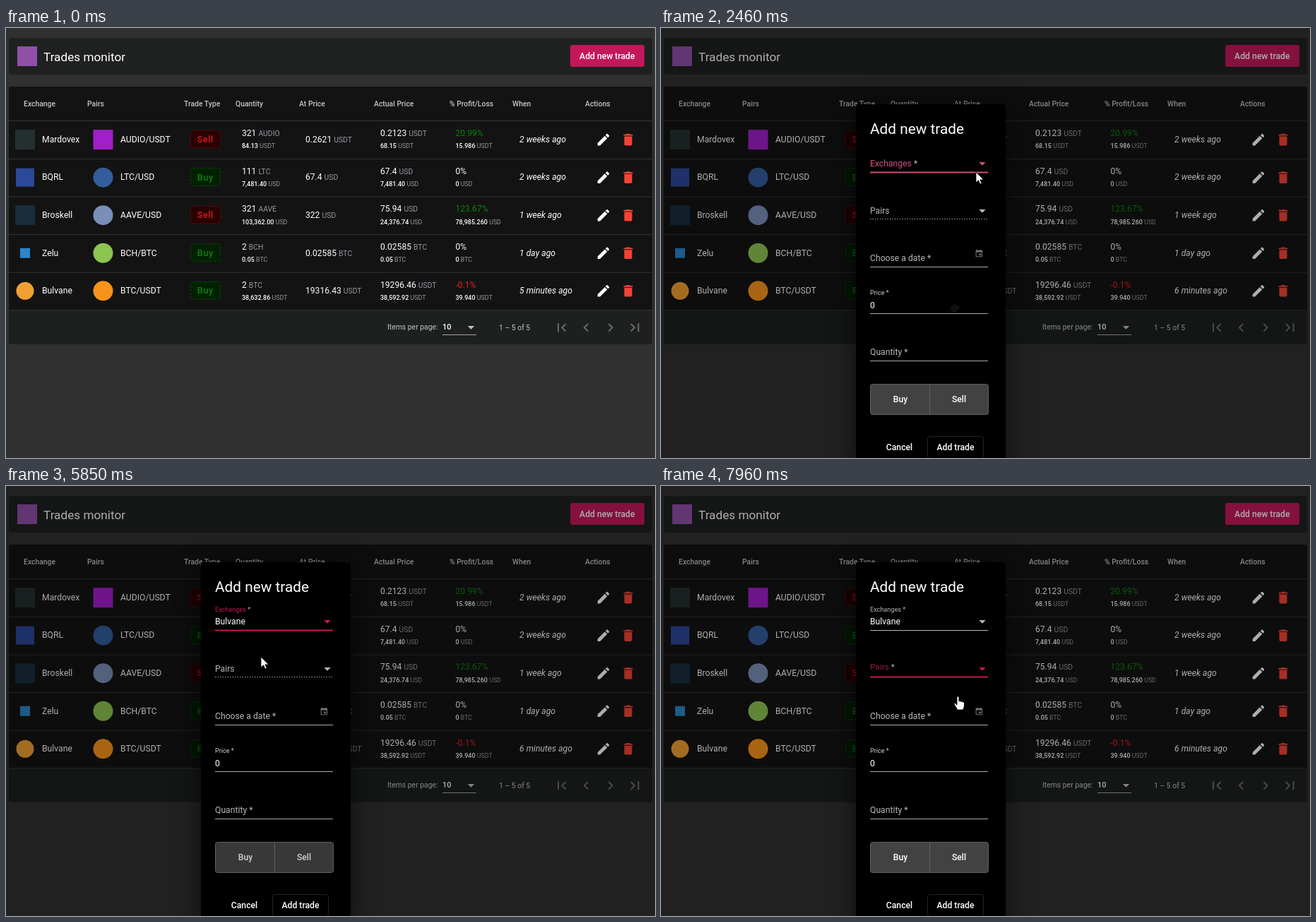
These frames come from a looping animation (919x609 px, 8000 ms). An HTML page:

```html
<!DOCTYPE html>
<html lang="en">
<head>
<meta charset="utf-8">
<title>Trades monitor</title>
<style>
html, body { margin: 0; width: 100%; height: 100%; overflow: hidden; background: #303030; }
svg { display: block; width: 919px; height: 609px; }
text { font-family: Roboto, "Open Sans", sans-serif; white-space: pre; }
.shadow { filter: drop-shadow(0 7px 18px rgba(0,0,0,.6)); }
</style>
</head>
<body>
<svg viewBox="0 0 919 609">
  <defs><clipPath id="panelClip"><rect id="panelBox" x="283" y="174" width="193.5" height="222" rx="3"/></clipPath></defs>
  <g id="page"></g>
  <g id="live"></g>
  <g id="pointer"></g>
</svg>
<script>
const LOOP = 8000, PINK = '#c2185b', SOFT = '#b8b8b8';
const el = id => document.getElementById(id);
const ramp = (t, a, b) => Math.min(1, Math.max(0, (t - a) / (b - a)));
const mix = (a, b, k) => a + (b - a) * k;
const smooth = k => k * k * (3 - 2 * k);
const easeOut = k => 1 - (1 - k) ** 3;

// y is the middle of the capital letters
const text = (x, y, s, { size = 12.2, fill = '#fff', w = 400, a = 'start', more = '' } = {}) =>
  `<text x="${x}" y="${y + size * .355}" font-size="${size}" fill="${fill}" font-weight="${w}" text-anchor="${a}" ${more}>${s}</text>`;
const rect = (x, y, w, h, fill, more = '') =>
  `<rect x="${x}" y="${y}" width="${w}" height="${h}" fill="${fill}" ${more}/>`;
const line = (x1, x2, y, color, w = 1, more = '') =>
  `<path d="M${x1} ${y}H${x2}" stroke="${color}" stroke-width="${w}" ${more}/>`;
const icon = (x, y, d, fill, k = .92) =>
  `<path transform="translate(${x} ${y}) scale(${k}) translate(-12 -12)" d="${d}" fill="${fill}"/>`;
const arrow = (x, y, fill) => `<path d="M${x - 4.7} ${y - 2}h9.4l-4.7 4.7z" fill="${fill}"/>`;
const badge = (x, y, [shape, color, size]) => shape === 'o'
  ? `<circle cx="${x}" cy="${y}" r="${size / 2}" fill="${color}"/>`
  : rect(x - size / 2, y - size / 2, size, size, color);

const marks = {
  Mardovex: ['s', '#24302f', 28], BQRL: ['s', '#2c4899', 26], Broskell: ['s', '#172d3e', 28],
  Zelu: ['s', '#2b86c8', 14], Bulvane: ['o', '#f0a030', 25], Bostwyn: ['o', '#0f82dd', 28],
  Drovik: ['o', '#5741d9', 28], Brambelicott: ['s', '#1f1f1f', 22], OrbVEL: ['s', '#2b9cd6', 24],
  AUDIO: ['s', '#a01fc8', 28], LTC: ['o', '#345d9d', 28], AAVE: ['o', '#7a8fb8', 28],
  BCH: ['o', '#8dc351', 28], BTC: ['o', '#f7931a', 28]
};

const icons = {
  edit: 'M3 17.25V21h3.75L17.81 9.94l-3.75-3.75L3 17.25zM20.71 7.04c.39-.39.39-1.02 0-1.41l-2.34-2.34c-.39-.39-1.02-.39-1.41 0l-1.83 1.83 3.75 3.75 1.83-1.83z',
  bin: 'M6 19c0 1.1.9 2 2 2h8c1.1 0 2-.9 2-2V7H6v12zM19 4h-3.5l-1-1h-5l-1 1H5v2h14V4z',
  date: 'M17 12h-5v5h5v-5zM16 1v2H8V1H6v2H5c-1.1 0-1.99.9-1.99 2L3 19c0 1.1.89 2 2 2h14c1.1 0 2-.9 2-2V5c0-1.1-.9-2-2-2h-1V1h-2zm3 18H5V8h14v11z',
  first: 'M18.41 16.59L13.82 12l4.59-4.59L17 6l-6 6 6 6zM6 6h2v12H6z',
  prev: 'M15.41 7.41L14 6l-6 6 6 6 1.41-1.41L10.83 12z',
  next: 'M10 6L8.59 7.41 13.17 12l-4.58 4.59L10 18l6-6z',
  last: 'M5.59 7.41L10.18 12l-4.59 4.59L7 18l6-6-6-6zM16 6h2v12h-2z'
};

const heads = { Exchange: 25, Pairs: 115, 'Trade Type': 252, Quantity: 325, 'At Price': 415,
  'Actual Price': 521, '% Profit/Loss': 628, When: 717, Actions: 820 };

// exchange, coin, currency, side, amount, total, price, actual, actual total, profit, gain, when
const trades = [
  ['Mardovex', 'AUDIO', 'USDT', 'Sell', '321', '84.13', '0.2621', '0.2123', '68.15', '20.99%', '15.986', '2 weeks ago'],
  ['BQRL', 'LTC', 'USD', 'Buy', '111', '7,481.40', '67.4', '67.4', '7,481.40', '0%', '0', '2 weeks ago'],
  ['Broskell', 'AAVE', 'USD', 'Sell', '321', '103,362.00', '322', '75.94', '24,376.74', '123.67%', '78,985.260', '1 week ago'],
  ['Zelu', 'BCH', 'BTC', 'Buy', '2', '0.05', '0.02585', '0.02585', '0.05', '0%', '0', '1 day ago'],
  ['Bulvane', 'BTC', 'USDT', 'Buy', '2', '38,632.86', '19316.43', '19296.46', '38,592.92', '-0.1%', '39.940', '5 minutes ago']
];

const unit = (s, size) => ` <tspan font-size="${size}" font-weight="400" fill="#949aa3">${s}</tspan>`;
const big = (x, y, n, u) => text(x, y, n + unit(u, 10.4), { size: 12.1 });
const small = (x, y, n, u) => text(x, y, n + unit(u, 8.8), { size: 9, w: 500 });

function tradeRow([name, coin, cur, side, amount, total, price, actual, actualTotal, profit, gain, when], i) {
  const y = 157.6 + i * 53.55, up = y - 8.5, down = y + 9.7;
  const [fill, edge, ink] = side === 'Sell' ? ['#2b0000', '#6a0c0c', '#d81c1c'] : ['#002100', '#0c4d0c', '#128012'];
  const tone = profit === '0%' ? '#fff' : profit[0] === '-' ? '#f01c1c' : '#0c800c';
  return line(4, 915, y + 27.9, '#343434') +
    badge(27, y + .5, marks[name]) + text(51, y, name) +
    badge(137.5, y + .5, marks[coin]) + text(162, y, `${coin}/${cur}`) +
    rect(261.5, y - 12.3, 42, 24.5, fill, `rx="4" stroke="${edge}" stroke-dasharray="3 2"`) +
    text(282.3, y, side, { size: 12.6, fill: ink, w: 500, a: 'middle', more: 'letter-spacing=".6"' }) +
    big(334, up, amount, coin) + small(334, down, total, cur) +
    big(424, y, price, cur) +
    big(530, up, actual, cur) + small(530, down, actualTotal, cur) +
    text(636.5, up, profit, { size: 12.1, fill: tone }) + small(636.5, down, gain, cur) +
    text(727, y, when, { more: `font-style="italic"${i === 4 ? ' id="age"' : ''}` }) +
    icon(846, y + .5, icons.edit, '#fff') + icon(881, y + .5, icons.bin, '#f44336');
}

el('page').innerHTML =
  rect(4, 14, 911, 52, '#1f2120', 'rx="4"') +
  badge(30, 40, ['s', '#8f50a8', 28]) +
  text(53, 41, 'Trades monitor', { size: 17.2 }) +
  rect(799, 24, 105, 31, PINK, 'rx="3"') +
  rect(799, 24, 105, 31, '#fff', 'rx="3" id="ripple" opacity="0"') +
  text(851.3, 39.2, 'Add new trade', { w: 500, a: 'middle' }) +
  rect(4, 83, 911, 365, '#1e2020', 'rx="3"') + rect(4, 83, 911, 317, '#131313', 'rx="3"') +
  line(4, 915, 131.5, '#343434') +
  Object.entries(heads).map(([s, x]) => text(x, 107, s, { size: 10.4, fill: '#c4c4c4', w: 500 })).join('') +
  trades.map(tradeRow).join('') +
  text(540, 423.3, 'Items per page:', { size: 10.4, fill: '#c4c4c4' }) +
  text(618, 423.3, '10', { size: 11, w: 500 }) + line(618, 666, 434.5, '#a5a5a5') + arrow(658.5, 424, '#c4c4c4') +
  text(698, 424, '1 – 5 of 5', { size: 10.4, fill: '#c4c4c4' }) +
  ['first', 'prev', 'next', 'last'].map((k, i) => icon(787 + i * 34.5, 424.3, icons[k], '#6c6c6c', 1)).join('');

// Field label that floats up and shrinks as k goes to 1
const label = (y, s, star, color, k) => {
  const size = mix(12.2, 9.1, k);
  return text(296, mix(y, y - 17, k), s + (star ? `<tspan fill="${SOFT}"> *</tspan>` : ''), { size, fill: color });
};

function arc(from, to, color, width, r, opacity = 1) {
  const at = d => `${396 + r * Math.cos(d * Math.PI / 180)} ${379 + r * Math.sin(d * Math.PI / 180)}`;
  return `<path d="M${at(from)}A${r} ${r} 0 0 1 ${at(to)}" fill="none" stroke="${color}" stroke-width="${width}" opacity="${opacity}"/>`;
}

function spinner(t) {
  if (t < 5850) {
    const k = ramp(t, 1120, 2460), a = mix(2, 43, k), c = mix(42, 13, k);
    return arc(a - 12, a + 12, `rgb(${c},${c + 3 * k},${c})`, 9, 27);
  }
  const a = 8 + (t - 6270) * .24;
  return arc(a, a + 132, '#202423', 8, 28, ramp(t, 5850, 6000) * (1 - ramp(t, 6500, 6570)));
}

function dialog(t) {
  const open = easeOut(ramp(t, 1050, 1200)), scale = mix(.7, 1, open);
  const focused = t >= 2400 && t < 7890, chosen = t >= 5690;
  const exColor = focused ? (t < 2560 ? '#cf4f83' : PINK) : SOFT;
  const busy = t > 5790 && t < 6560, ready = t >= 6560, onPairs = t >= 7890;
  const pairColor = onPairs ? PINK : SOFT;
  const pairLine = onPairs ? line(296, 463, 270.5, PINK, 2)
    : line(296, 463, 270.5, '#aaa', 1, ready ? '' : 'stroke-dasharray="1.5 2"');
  const toggleInk = busy ? '#d0d0d0' : '#fff';
  const field = y => line(296, 463, y, '#aaa');
  return `<g opacity="${open}" transform="translate(382 362) scale(${scale}) translate(-382 -362)">` +
    rect(276, 108, 212, 522, '#000', 'rx="4" class="shadow"') +
    text(296, 142.3, 'Add new trade', { size: 20.8 }) +
    label(192, 'Exchanges', true, exColor, smooth(ramp(t, 2560, 2700))) +
    (chosen ? text(296, 192, 'Bulvane') : '') +
    arrow(455, 192, exColor) + line(296, 463, 204.5, exColor, focused ? 2 : 1) +
    label(258.5, 'Pairs', ready, onPairs ? '#9c1a50' : SOFT, ramp(t, 7940, 8100)) +
    arrow(455, 259, pairColor) + pairLine +
    text(296, 325.7, 'Choose a date *', { fill: SOFT }) + field(338.5) +
    icon(450.3, 319.5, icons.date, '#777', .52) +
    spinner(t) +
    text(296, 375.2, 'Price *', { size: 9.1, fill: '#d0d0d0' }) + text(296, 392.5, '0') + field(404.5) +
    text(296, 459, 'Quantity *', { fill: SOFT }) + field(471.5) +
    rect(296.5, 504.5, 167, 43, busy ? '#383838' : '#424242', 'rx="3" stroke="#606060"') +
    rect(380, 505, 1, 42, '#606060') +
    text(339, 525.3, 'Buy', { w: 500, a: 'middle', fill: toggleInk }) +
    text(422, 525.3, 'Sell', { w: 500, a: 'middle', fill: toggleInk }) +
    text(337.5, 593.5, 'Cancel', { w: 500, a: 'middle' }) +
    rect(377.5, 578.5, 79, 31, 'none', 'rx="3" stroke="#242424"') +
    text(417, 593.5, 'Add trade', { w: 500, a: 'middle' }) + '</g>';
}

const names = ['Mardovex', 'BQRL', 'Bostwyn', 'Drovik', 'Brambelicott', 'Broskell', 'OrbVEL', 'Bulvane'];

function panel(t, hover) {
  const query = t < 4890 ? '' : t < 5100 ? 'b' : t < 5240 ? 'bu' : 'bul';
  const found = names.filter(s => s.toLowerCase().includes(query)).slice(0, 5);
  const full = found.length > 1, height = full ? 221.7 : 83, inner = full ? 184 : 194;
  const caret = query || (t >= 4160 && t < 4690);
  const caretX = 296.5 + query.length * 6.8 - (query.length > 2 ? 3.5 : 0);
  el('panelBox').setAttribute('height', height);
  const k = easeOut(ramp(t, 2560, 2680)), stretch = mix(.8, 1, k);
  return `<g opacity="${k * (1 - ramp(t, 5690, 5790))}" transform="translate(0 ${174 * (1 - stretch)}) scale(1 ${stretch})">` +
    `<g clip-path="url(#panelClip)">` + rect(283, 174, 194, 222, '#424242') +
    (!query || hover ? rect(283, 219.7, inner, 36.3, '#4a4a4a') : '') +
    rect(283, 174.5, inner, 45, '#fff') +
    (full ? rect(467, 174, 10, 16, '#262626', 'rx="4"') : '') +
    text(296, 196.3, query || 'Search...', { fill: query ? '#777' : '#9a9a9a' }) +
    (caret ? rect(caretX, 190, 1, 14, '#555') : '') +
    (query ? rect(450.5, 197.5, 1.6, 1.6, '#444') : '') +
    found.map((s, i) => badge(310, 238 + i * 36.25, marks[s]) + text(341, 238 + i * 36.25, s)).join('') +
    '</g></g>';
}

const route = [[70, 900, 622], [710, 852, 48.5], [2200, 852, 48.5], [2440, 446, 204], [2620, 446, 204],
  [2960, 410, 271], [3230, 410, 271], [3550, 393.2, 257.5], [3970, 372, 213], [4090, 372, 213], [4230, 367.5, 204],
  [5300, 367.5, 204], [5600, 361, 242], [6530, 361, 242], [7220, 421, 298], [LOOP, 421, 298]];

function pointerAt(t) {
  const i = Math.max(1, route.findIndex(p => p[0] > t));
  const [a, b] = [route[i - 1], route[i]], k = smooth(ramp(t, a[0], b[0]));
  return [mix(a[1], b[1], k), mix(a[2], b[2], k)];
}

const cursors = {
  arrow: '<path d="M0 0V15l3.5-3.3 2.4 5.4 2.3-1-2.4-5.2h5z" fill="#fff" stroke="#000" stroke-width=".8"/>',
  hand: '<path d="M-2 1.5Q-2 0 -.5 0T1 1.5V7Q2.5 6 4 7.2Q5.5 6.5 6.5 8Q8.5 7.5 8.5 9.5V13Q8.5 16 6.5 19H-1.5Q-3 15 -5.5 12Q-6.5 10 -4.5 9.5L-2 12Z" fill="#fff" stroke="#000" stroke-width=".9"/>',
  beam: '<path d="M-3-7h2.5M.5-7H3M0-6.5v13M-3 7h2.5M.5 7H3" stroke="#222" stroke-width="1.2"/>'
};

function draw(t) {
  const [x, y] = pointerAt(t), listed = t >= 2560 && t < 5790;
  const kind = listed && t > 2650 ? (y > 219 ? 'hand' : 'beam') : t > 6950 ? 'hand' : 'arrow';
  el('ripple').setAttribute('opacity', .17 * ramp(t, 900, 1000) * (1 - ramp(t, 1200, 1700)));
  el('age').textContent = (t < 920 ? 5 : 6) + ' minutes ago';
  const shade = .32 * easeOut(ramp(t, 1045, 1400));
  el('live').innerHTML = t < 1045 ? '' :
    rect(0, 0, 919, 609, '#000', `opacity="${shade}"`) + dialog(t) + (listed ? panel(t, kind === 'hand') : '');
  el('pointer').innerHTML = `<g transform="translate(${x} ${y})">${cursors[kind]}</g>`;
}

const start = performance.now();
function tick() {
  draw((performance.now() - start) % LOOP);
  requestAnimationFrame(tick);
}
tick();
</script>
</body>
</html>
```
